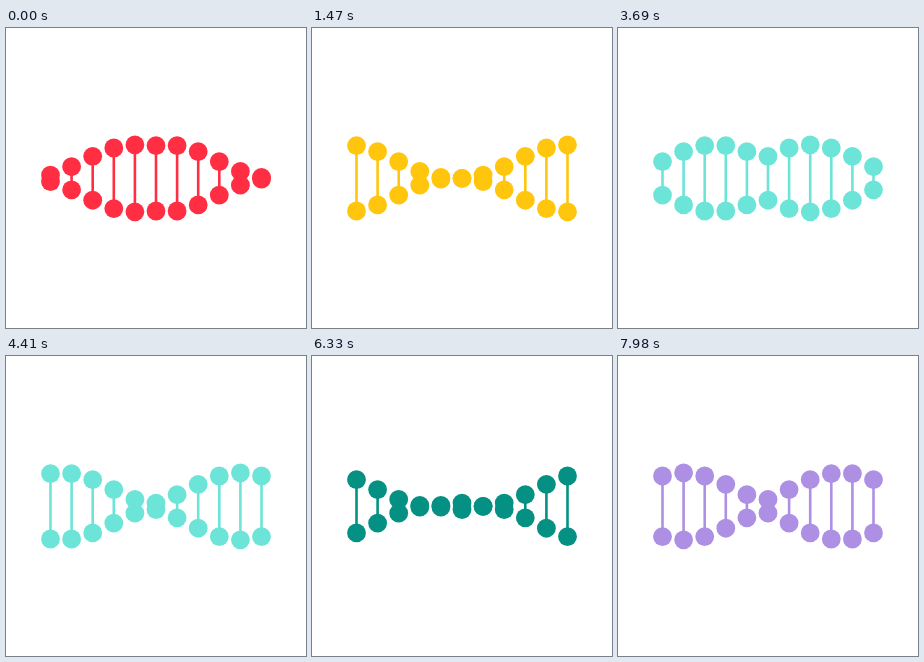
An HTML page for the animation above (8000 ms loop, 300 by 300 pixels).

```html
<!DOCTYPE html>
<html lang="en">
<head>
<meta charset="utf-8">
<title>Helix loader</title>
<style>
  html, body { margin: 0; width: 100%; height: 100%; overflow: hidden; background: #fff; }
  svg { display: block; width: 100%; height: 100%; }
</style>
</head>
<body>
<svg id="stage" viewBox="0 0 300 300"></svg>
<script>
  const LOOP = 8000, TICK = 30, PERIOD = 600;
  const COUNT = 11, MID = 5, GAP = 21.1, CX = 150, CY = 150.3;
  const REACH = 33.5, RADIUS = 9.4;
  const COLORS = ['#ff2e43', '#ffc60d', '#6ce5d8', '#049183', '#ad8fe4'];
  const HOLD = 1800, LEAD = 600;

  const stage = document.getElementById('stage');

  function add(parent, tag, attrs) {
    const el = document.createElementNS('http://www.w3.org/2000/svg', tag);
    for (const key in attrs) el.setAttribute(key, attrs[key]);
    return parent.appendChild(el);
  }

  const helix = add(stage, 'g', { 'stroke-width': 2.6 });

  const rungs = Array.from({ length: COUNT }, (_, i) => {
    const x = CX + (i - MID) * GAP;
    // Stagger runs outward from the middle, alternating right and left.
    const order = i >= MID ? 2 * (i - MID) : 2 * (MID - i) - 1;
    const dot = { cx: x, r: RADIUS, stroke: 'none' };
    return {
      delay: (order - 1) * TICK,
      line: add(helix, 'line', { x1: x, x2: x }),
      top: add(helix, 'circle', dot),
      bottom: add(helix, 'circle', dot)
    };
  });

  function draw(time) {
    const t = Math.floor((time % LOOP) / TICK) * TICK;
    const color = COLORS[Math.floor((t + LEAD) / HOLD) % COLORS.length];
    helix.setAttribute('fill', color);
    helix.setAttribute('stroke', color);

    for (const { delay, line, top, bottom } of rungs) {
      const phase = 2 * Math.PI * (t - delay) / PERIOD;
      const h = REACH * (1 + Math.cos(phase)) / 2;
      line.setAttribute('y1', CY - h);
      line.setAttribute('y2', CY + h);
      top.setAttribute('cy', CY - h);
      bottom.setAttribute('cy', CY + h);
    }
  }

  const start = performance.now();
  function tick() {
    draw(performance.now() - start);
    requestAnimationFrame(tick);
  }
  tick();
</script>
</body>
</html>
```
